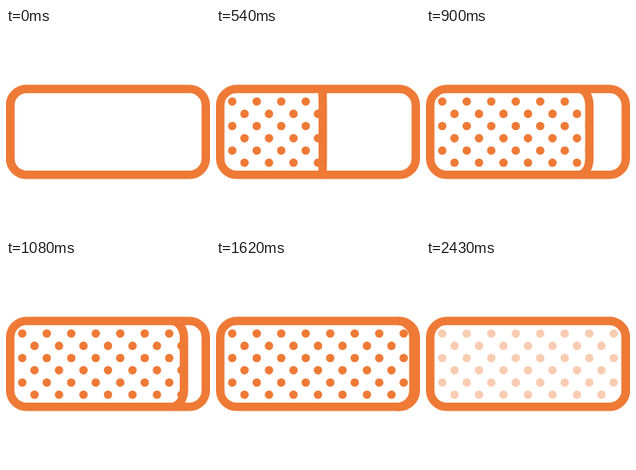
Write an HTML page that moves like this. It is 256 by 256 pixels and loops after 2520 ms.

```html
<!DOCTYPE html>
<html lang="en">
<head>
<meta charset="utf-8">
<title>Dotted fill</title>
<style>
  html, body { margin: 0; width: 100%; height: 100%; overflow: hidden; background: #fff; }
  svg { display: block; width: 100vw; height: 100vh; }
  .line { fill: none; stroke: #ee7a36; stroke-width: 10.6; }
  #dots { fill: #ee7a36; }
</style>
</head>
<body>
<svg viewBox="0 0 256 256">
  <g id="dots"></g>
  <path id="cover" fill="#fff"/>
  <path id="bar" class="line"/>
  <rect class="line" x="5.3" y="76.5" width="245.4" height="107.8" rx="20.5"/>
</svg>
<script>
const STEP = 90, LOOP = 2520;
const LEFT = 5.3, RIGHT = 250.7, TOP = 76.5, BOTTOM = 184.3, R = 20.5;
const MID = (LEFT + RIGHT) / 2;

// Bar centre per step, slowing down towards the right edge
const SWEEP = [LEFT, LEFT, LEFT, 43.5, 77, 107.5, 134, 157, 176, 192, 205, 215, 223.3,
  230, 235.5, 239.8, 243.2, 245.8, 247.7, 249.1, 250, 250.4, RIGHT];
const FADE = { 26: 0.7, 27: 0.38 };

const $ = id => document.getElementById(id);
const dots = $('dots'), cover = $('cover'), bar = $('bar');

for (let col = 0; col < 15; col++) {
  for (let row = col % 2; row < 6; row += 2) {
    const dot = document.createElementNS('http://www.w3.org/2000/svg', 'circle');
    dot.setAttribute('cx', 20.4 + 15.37 * col);
    dot.setAttribute('cy', 92.3 + 15.35 * row);
    dot.setAttribute('r', 5.3);
    dots.append(dot);
  }
}

// Corners bend left, flatten at the middle, then bend right
function edge(x) {
  const rx = R * (x - MID) / (RIGHT - MID);
  const x0 = x - rx, cx = x - rx * 0.448, k = R * 0.448;
  return `M${x0} ${TOP}C${cx} ${TOP} ${x} ${TOP + k} ${x} ${TOP + R}` +
    `V${BOTTOM - R}C${x} ${BOTTOM - k} ${cx} ${BOTTOM} ${x0} ${BOTTOM}`;
}

function draw(now) {
  const step = Math.floor((now % LOOP) / STEP);
  const path = edge(SWEEP[Math.min(step, SWEEP.length - 1)]);
  bar.setAttribute('d', path);
  cover.setAttribute('d', `${path}H${RIGHT}V${TOP}Z`);
  dots.setAttribute('opacity', FADE[step] ?? 1);
}

let start;
function tick(now) {
  start ??= now;
  draw(now - start);
  requestAnimationFrame(tick);
}
draw(0);
requestAnimationFrame(tick);
</script>
</body>
</html>
```
